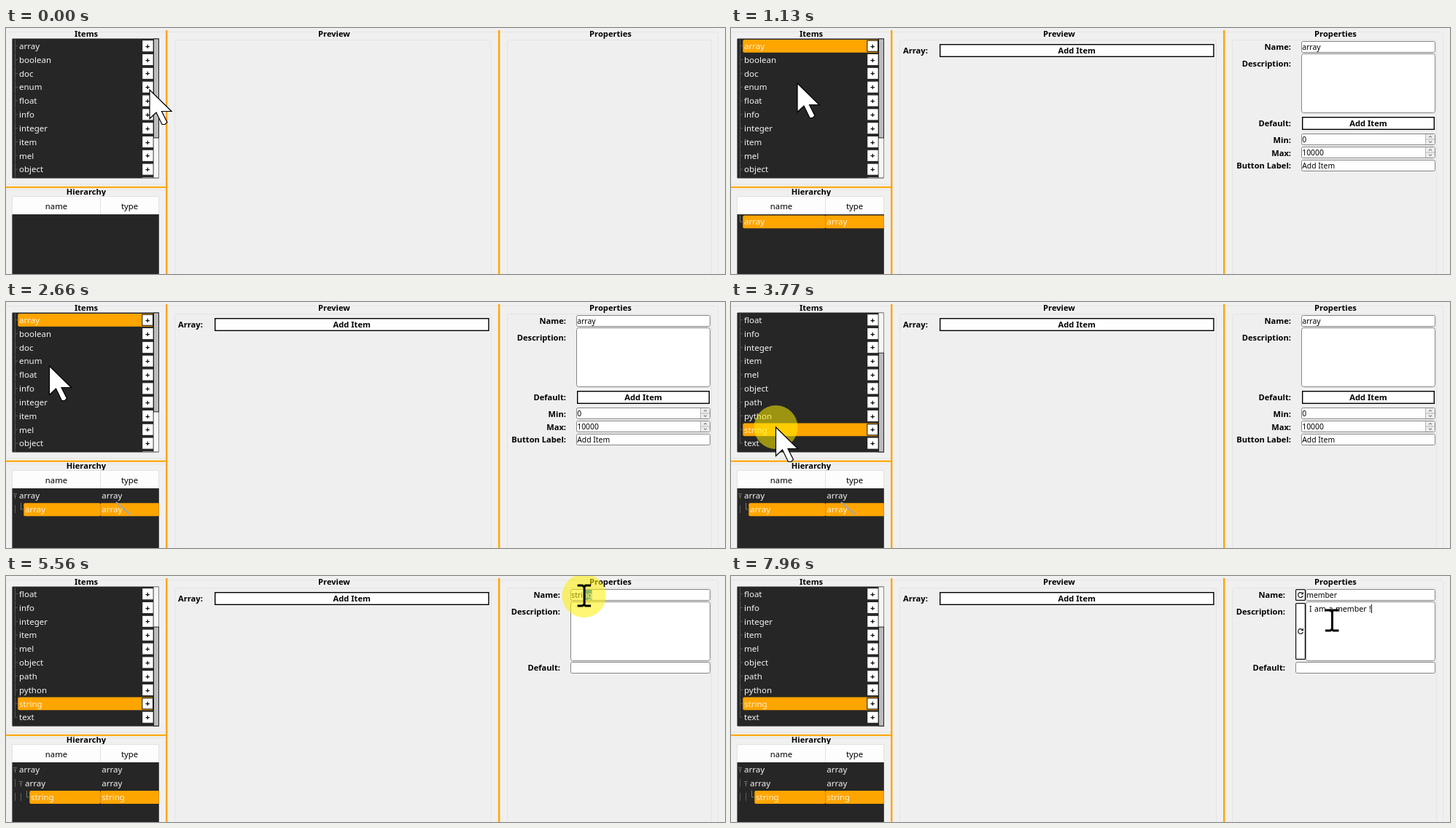
These frames come from a looping animation (986 by 338 pixels, 8000 ms). An HTML page:

```html
<!DOCTYPE html>
<html lang="en">
<head>
<meta charset="utf-8">
<title>Form builder</title>
<style>
  html, body { margin: 0; width: 100%; height: 100%; overflow: hidden; background: #f0f0f0; }
  svg { display: block; width: 986px; height: 338px; font-family: "Noto Sans", "Open Sans", sans-serif; }
  text { white-space: pre; }
</style>
</head>
<body>
<svg id="stage" viewBox="0 0 986 338"></svg>
<script>
const LOOP = 8000, ROW = 18.83, ORANGE = '#ffa500', DARK = '#262626';
const ITEMS = 'array boolean doc enum float info integer item mel object path python string text'.split(' ');
const NAME = 'member', NOTE = 'I am a member !';
const NAME_KEYS = [5910, 5950, 5990, 6130, 6200, 6270];

// Moments at which the interface changes
const PICK_ARRAY = 400, DROP_1 = 930, DROP_2 = 2200, SCROLL = 2720,
      PICK_STRING = 3690, DROP_3 = 4250, SELECT = 5480, LEAVE_NAME = 6720, TYPE_NOTE = 6970;

// Pointer path: time, x, y
const PATH = [
  [0, 197, 85], [20, 197, 85], [330, 50, 27], [400, 50, 27], [800, 80, 275], [930, 80, 277],
  [1130, 91, 76], [1400, 50, 27], [1560, 50, 27], [2000, 70, 264], [2300, 75, 270],
  [2440, 76, 250], [2660, 59.5, 88], [3320, 59.5, 88], [3560, 61.5, 172], [3820, 61.5, 172],
  [4100, 90, 271], [4300, 100, 280], [4650, 125, 276], [5040, 430, 140], [5400, 808, 26],
  [5480, 808, 26], [5720, 750, 30], [6400, 750, 30], [6510, 746, 62], [6700, 816, 61],
  [6900, 816, 61], [7000, 824, 61], [LOOP, 824, 61]
];
const PRESSES = [[430, 930], [1580, 2200], [3700, 4250], [SELECT, 5740], [6700, 6850]];

const stage = document.getElementById('stage');
const pen = document.createElement('canvas').getContext('2d');

const rect = (x, y, w, h, fill, extra = '') =>
  `<rect x="${x}" y="${y}" width="${w}" height="${h}" fill="${fill}" ${extra}/>`;
const box = (x, y, w, h, stroke, r = 0, fill = '#fff', weight = 1) =>
  rect(x + weight / 2, y + weight / 2, w - weight, h - weight, fill,
    `stroke="${stroke}" stroke-width="${weight}" rx="${r}"`);
const line = (d, stroke, w = 1) => `<path d="${d}" fill="none" stroke="${stroke}" stroke-width="${w}"/>`;
const text = (x, y, s, size, fill = '#000', extra = '') =>
  `<text x="${x}" y="${y + 4}" font-size="${size}" fill="${fill}" ${extra}>${s}</text>`;
const bold = (x, y, s, anchor = 'middle') =>
  text(x, y, s, 11.15, '#000', `font-weight="700" text-anchor="${anchor}"`);
const button = (x, y, w, h, label) =>
  box(x, y, w, h, '#000', 0, '#fff', 1.4) + bold(x + w / 2, y + h / 2, label);

function textWidth(s, size) {
  pen.font = `${size}px "Noto Sans", "Open Sans", sans-serif`;
  return pen.measureText(s).width;
}

function pointer(t) {
  const i = Math.max(1, PATH.findIndex(p => p[0] > t));
  const [a, x0, y0] = PATH[i - 1], [b, x1, y1] = PATH[i];
  const u = (t - a) / (b - a), k = u * u * (3 - 2 * u);
  return [x0 + (x1 - x0) * k, y0 + (y1 - y0) * k];
}

function frames() {
  const edge = '#e4e4e4';
  return line('M0 5.5H219M222 5.5H675M678 5.5H973.5Q976.5 5.5 976.5 8.5V338M0 222.5H219M0 214.5H219', edge)
    + box(231, 16, 435, 340, edge, 3, '#efefef') + box(687, 16, 281, 340, edge, 3, '#efefef')
    + [[110, 8, 36], [450, 8, 48], [829, 8, 62], [110, 225, 58]]
        .map(([x, y, w]) => rect(x - w / 2, y - 6, w, 11, '#f0f0f0')).join('')
    + rect(219, 3, 2.4, 335, ORANGE) + rect(675, 3, 2.4, 335, ORANGE) + rect(0, 217.7, 221, 2.1, ORANGE)
    + bold(110, 8, 'Items') + bold(450, 8, 'Preview') + bold(829, 8, 'Properties') + bold(110, 225, 'Hierarchy');
}

function itemList(t) {
  const offset = Math.min(4, Math.max(0, Math.floor((t - SCROLL) / 140)));
  const chosen = t < PICK_ARRAY ? -1 : t < PICK_STRING ? 0 : 12;
  let s = rect(8.4, 14.4, 201.4, 192, DARK, 'rx="1"') + '<g clip-path="url(#list)">';
  ITEMS.forEach((name, i) => {
    const y = 24.7 + (i - offset) * ROW, on = i === chosen;
    if (y < 0 || y > 220) return;
    s += line(`M12.5 ${y - 9}V${i === 13 ? y : y + 9}M12.5 ${y}H16`, '#565650');
    if (on) s += rect(16.3, y - 8.8, 185.7, 17.8, ORANGE, 'rx="2"');
    s += text(18, y + .2, name, 11.5, on ? '#fff3d8' : '#f4f4f4');
    s += on ? box(186.3, y - 8, 15.7, 16, '#111') : rect(187.2, y - 7.5, 14.4, 15, '#fff');
    s += bold(194.2, y, '+');
  });
  const top = 14.4 + offset * 13.8;
  return s + '</g>' + box(202, 14.4, 8, 192, '#8a8a8a', 0, '#f6f6f6') + box(202, top, 8, 137, '#222', 0, '#bcbcbc');
}

function hierarchy(t) {
  let s = rect(8, 232, 202, 24, '#fdfdfd') + line('M8.5 256V231.5H209.5V256M129.5 232V256', '#e2e2e2')
    + text(69, 244.5, 'name', 11.3, '#000', 'text-anchor="middle"')
    + text(169.5, 244.5, 'type', 11.3, '#000', 'text-anchor="middle"')
    + rect(8.4, 256, 201.4, 82, DARK);
  const depth = [DROP_1, DROP_2, DROP_3].filter(d => t >= d).length;
  ['array', 'array', 'string'].slice(0, depth).forEach((name, i) => {
    const y = 266.2 + i * ROW, x = 12.5 + i * 8, on = i === depth - 1;
    const hover = i === 1 && depth === 3 && t < 4780;
    const fill = on ? '#fff3d8' : hover ? ORANGE : '#f4f4f4';
    for (let k = 0; k < i; k++) s += line(`M${12.5 + k * 8} ${y - 6}V${y + 5}`, '#5c5c5c');
    s += on ? line(`M${x} ${y - 9}V${y}H${x + 3}`, '#77776a')
            : line(`M${x - 2.5} ${y - 2.5}H${x + 2.5}M${x - 1.5} ${y}H${x + 1.5}M${x} ${y}V${y + 4}`, '#77776a');
    if (on) {
      const left = 16.3 + i * 8;
      s += rect(left, y - 8.8, 129.8 - left, 17.9, ORANGE, 'rx="2"') + rect(129.8, y - 8.8, 80, 17.9, ORANGE, 'rx="1"');
    }
    s += text(18 + i * 8, y, name, 11.5, fill) + text(131.3, y, name, 11.5, fill);
  });
  if (depth === 2) s += line('M151 275L171 292.5', '#a0a7b0', 2);
  return s;
}

const field = (x, y, h, value = '', r = 2) =>
  box(x, y, 966 - x, h, '#858585', r) + text(x + 1.2, y + h / 2 + .3, value, 10.4);

const spin = (y, value) => field(782, y, 16, value)
  + rect(953, y + 1, 12, 14, '#ececec') + line(`M952.5 ${y + 1}V${y + 15}M953 ${y + 8}H965`, '#b8b8b8')
  + line(`M957 ${y + 5.3}L959 ${y + 3.5}L961 ${y + 5.3}M957 ${y + 10.7}L959 ${y + 12.5}L961 ${y + 10.7}`, '#555');

function resetButton(y, h) {
  const c = y + h / 2;
  return box(774, y, 14, h, '#111', 1, '#fff', 1.2)
    + line(`M783.4 ${c - 2.4}A3.4 3.4 0 1 0 784.4 ${c + .8}`, '#111', 1.2)
    + `<path d="M785 ${c - 4.3}V${c - .8}H781.5Z" fill="#111"/>`;
}

function arrayForm() {
  const labels = [['Name:', 26], ['Description:', 49], ['Default:', 131], ['Min:', 153.5], ['Max:', 171.5], ['Button Label:', 189]];
  return labels.map(([s, y]) => bold(768, y, s, 'end')).join('')
    + field(782, 18, 16, 'array') + field(782, 35, 82, '', 3)
    + button(783, 122, 182, 18, 'Add Item')
    + spin(145, '0') + spin(163, '10000') + field(782, 181, 16, 'Add Item');
}

function stringForm(t, px) {
  const typed = NAME_KEYS.filter(k => t >= k).length;
  const name = typed ? NAME.slice(0, typed) : 'string';
  const count = Math.max(0, Math.min(NOTE.length, Math.floor((t - TYPE_NOTE) / 60) + 1));
  const note = NOTE.slice(0, count);
  const nameX = t >= LEAVE_NAME ? 788 : 774, noteX = count ? 788 : 774;
  let s = [['Name:', 26], ['Description:', 49], ['Default:', 126]].map(([l, y]) => bold(760, y, l, 'end')).join('');
  s += field(nameX, 18, 16, name) + field(noteX, 35, 82, '', 3) + field(774, 118, 16);
  if (nameX > 774) s += resetButton(18, 16);
  if (count) s += resetButton(37, 78);
  if (t >= SELECT && !typed) {
    const left = Math.max(775, Math.min(803, px));
    s += `<clipPath id="sel">${rect(left, 19, 803.5 - left, 14, '#000')}</clipPath>`
      + rect(left, 19, 803.5 - left, 14, '#0078d7')
      + text(775.2, 26.3, name, 10.4, '#fff', 'clip-path="url(#sel)"');
  }
  if (t >= LEAVE_NAME) {
    const gap = .75, spaces = note.split(' ').length - 1;
    const end = noteX + 5 + textWidth(note, 10.6) + spaces * gap;
    s += text(noteX + 5, 45, note, 10.6, '#000', `word-spacing="${gap}"`)
      + line(`M${Math.round(end) + .5} 39V51`, '#111');
  }
  return s;
}

function cursor(t, x, y) {
  const pressed = PRESSES.some(([a, b]) => t >= a && t < b);
  let s = pressed && !(t < DROP_2 && y < 44)
    ? `<circle cx="${x}" cy="${y}" r="30" fill="#ffee00" opacity=".55"/>` : '';
  const editing = t > 5000 && x > 774 && y > 18 && y < 116;
  const shape = editing
    ? '<path d="M-9 -14H-2L0 -12L2 -14H9.5M-9 14H-2L0 12L2 14H9.5M.5 -12V12" fill="none" stroke="#000" stroke-width="3"/>'
    : '<path d="M0 0V39.5L9 31L17 47.5H21L24 44.5L16.5 29.5H30Z" fill="#fff" stroke="#000" stroke-width="1.2"/>';
  return s + `<g transform="translate(${x} ${y})">${shape}</g>`;
}

function draw(t) {
  const [x, y] = pointer(t);
  let s = `<clipPath id="list">${rect(8, 15, 194, 191, '#000')}</clipPath>`
    + rect(0, 0, 986, 338, '#f0f0f0') + frames() + itemList(t) + hierarchy(t);
  if (t >= DROP_1) {
    s += bold(236, 31, 'Array:', 'start') + button(286, 22, 376.6, 18, 'Add Item');
    s += t < DROP_3 ? arrayForm() : stringForm(t, x);
  }
  stage.innerHTML = s + cursor(t, x, y);
}

const start = performance.now();
function tick() {
  draw((performance.now() - start) % LOOP);
  requestAnimationFrame(tick);
}
tick();
</script>
</body>
</html>
```
